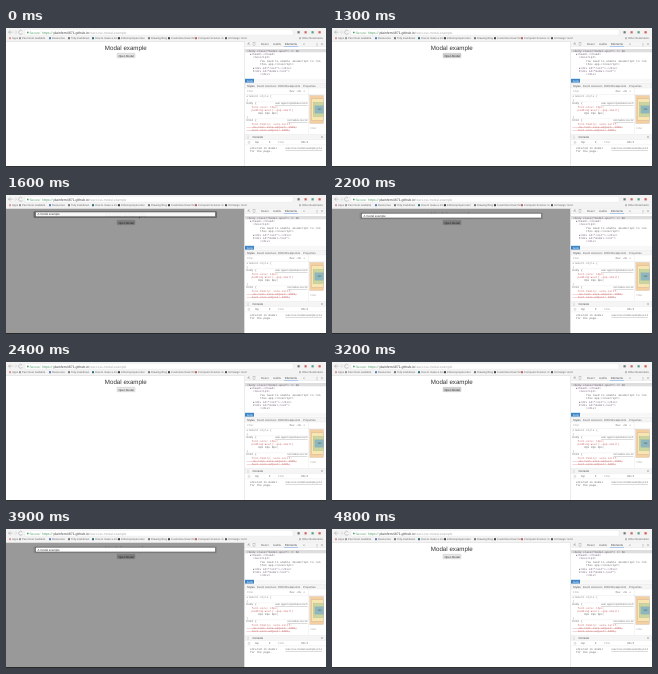
Write an HTML page that moves like this. It is 320x139 px and loops after 5100 ms.

```html
<!DOCTYPE html>
<html lang="en">
<head>
<meta charset="utf-8">
<title>Modal example</title>
<style>
html, body { margin: 0; width: 100%; height: 100%; overflow: hidden; background: #fff; }
svg { display: block; }
text { font-family: "Liberation Sans", Arial, sans-serif; white-space: pre; text-rendering: geometricPrecision; }
.mono { font-family: "Liberation Mono", monospace; }
</style>
</head>
<body>
<svg width="320" height="139" viewBox="0 0 320 139">
  <g id="page"></g>
  <g id="overlay">
    <rect y="13.5" width="238.5" height="125" fill="#000" opacity=".4"/>
    <g id="modal"></g>
  </g>
  <g id="chrome"></g>
  <g id="tools"></g>
</svg>
<script>
const $ = id => document.getElementById(id);
let layer;

function add(tag, attrs, content = '') {
  const el = document.createElementNS('http://www.w3.org/2000/svg', tag);
  for (const key in attrs) el.setAttribute(key, attrs[key]);
  el.textContent = content;
  return layer.appendChild(el);
}
const rect = (x, y, width, height, fill, more) => add('rect', { x, y, width, height, fill, ...more });
const text = (x, y, str, size, fill = '#666', more) => add('text', { x, y, 'font-size': size, fill, ...more }, str);
const path = (d, stroke, width = .4) => add('path', { d, stroke, 'stroke-width': width, fill: 'none' });
const code = (x, y, str, fill, more) => text(x, y, str, 2.8, fill, { class: 'mono', ...more });

// Page
layer = $('page');
text(119.8, 21.8, 'Modal example', 6.2, '#333', { 'text-anchor': 'middle' });
const button = rect(111, 25.3, 18, 4.4, '#e8e8e8', { rx: .6, stroke: '#bbb', 'stroke-width': .4 });
text(120, 28.5, 'Open Modal', 2.8, '#333', { 'text-anchor': 'middle' });

// Modal, drawn at its resting place
layer = $('modal');
const shadow = rect(27.5, 17.5, 183.5, 6.7, '#000', { rx: 1, opacity: .3 });
rect(29.5, 18.2, 180, 4.8, '#fff', { stroke: '#555', 'stroke-width': .6 });
text(31.5, 21.7, 'A modal example', 2.9, '#333');

// Browser bars
layer = $('chrome');
rect(0, 0, 320, 13.6, '#f3f3f3');
rect(0, 13.2, 320, .4, '#d0d0d0');
path('M4.5 2.4l-2 1.8 2 1.8M2.5 4.2h4', '#888');
path('M9 2.4l2 1.8-2 1.8M11 4.2H7.5', '#ccc');
path('M16.2 3a2 2 0 1 0 .3 2', '#888');
rect(19, 1.4, 268, 5.8, '#fff', { rx: 1, stroke: '#ddd', 'stroke-width': .3 });
rect(21, 3.7, 1.6, 1.6, '#5a9f70');
text(23.4, 5.5, 'Secure', 3.3, '#5a9f70');
rect(34.4, 2.6, .2, 3.4, '#ccc');
text(36, 5.5, 'https://', 3.5, '#5a9f70');
text(47.4, 5.5, 'plainfern4871.github.io', 3.5, '#444');
text(82.4, 5.5, '/react-css-modal-example', 3.3, '#aaa');
['#777', '#c66', '#5a9f80', '#d65a4e']
  .forEach((c, i) => rect(291.5 + i * 7, 3.2, 2.2, 2.2, c));
[
  [3, 'Apps', '#d99'], [13, 'Past most readable', '#999'], [43, 'Resources', '#5b7fb0'],
  [62, 'Tidy markdown', '#777'], [86, 'How to make a mo', '#2f6f78'],
  [112, 'intheloop/open-inter', '#444'], [142, 'Drawing Blog', '#777'],
  [162, 'Customize React M', '#444'], [189, 'Computer Science: G', '#b66'],
  [219, 'UI Design: Grid', '#555'], [293, 'Other Bookmarks', '#bbb']
].forEach(([x, label, color]) => {
  rect(x, 9.2, 2, 2, color);
  text(x + 3, 11.2, label, 2.7);
});

// Developer tools
layer = $('tools');
const tag = '#75607a', prop = '#cc7070', rule = '#ddd';
rect(238.5, 13.7, 81.5, 125, '#fff');
rect(238.4, 13.7, .4, 125, '#ccc');
rect(239, 13.7, 81, 5.2, '#f5f5f5');
rect(239, 18.7, 81, .3, rule);
path('M242 15l2.3 2.2M242 15v2M242 15h2', '#888');
rect(247, 14.8, 2, 2.8, 'none', { stroke: '#888', 'stroke-width': .3 });
text(255, 17.2, 'React', 2.9);
text(267, 17.2, 'Audits', 2.9);
text(279, 17.2, 'Elements', 2.9, '#444');
rect(278, 18.2, 14, .5, '#6c9ee8');
text(297, 17.2, '»', 3.2);
path('M311 15.2v.7m0 .5v.7m0 .5v.6', '#888', .6);
path('M315 15.1l2 2m0-2l-2 2', '#888');

rect(239, 21, 81, 3.3, '#dedede');
[
  [241, '<body class="modal-open"> == $0', tag],
  [244, '▸<head>…</head>', tag],
  [247, '<noscript>', tag],
  [254, 'You need to enable JavaScript to run'],
  [254, 'this app.</noscript>'],
  [247, '▸<div id="root">…</div>', tag],
  [247, '▾<div id="modal-root">', tag],
  [254, '</div>', tag]
].forEach(([x, str, color], i) => code(x, 23.5 + i * 3.4, str, color));
rect(239, 50.8, 81, 3.8, '#f7f7f7');
rect(239, 50.8, 9, 3.8, '#3d85c6');
text(241, 53.6, 'body', 2.7, '#fff');

rect(239, 55.2, 81, 4.8, '#f5f5f5', { stroke: rule, 'stroke-width': .3 });
text(241, 58.5, 'Styles', 2.8, '#444');
text(251, 58.5, 'Event Listeners', 2.8);
text(272, 58.5, 'DOM Breakpoints', 2.8);
text(297, 58.5, 'Properties', 2.8);
text(241, 64.2, 'Filter', 2.8, '#aaa');
text(283, 64.2, ':hov   .cls   +', 2.8);
rect(239, 66, 81, .3, rule);
rect(302.4, 60, .3, 46, rule);

const link = (x, y, str) =>
  text(x, y, str, 2.7, '#777', { 'text-anchor': 'end', 'text-decoration': 'underline' });
const struck = { 'text-decoration': 'line-through' };
[
  ['element.style {', '#888'], ['}', '#888'],
  ['body {'], ['   font-size: 16px;', prop], ['   padding:▸var(--gap-small)', prop],
  ['       0px 0px 0px;'], ['}', '#888'],
  ['html {'], ['   font-family: sans-serif;', prop],
  ['   -ms-text-size-adjust: 100%;', prop, struck], ['   text-size-adjust: 100%;', prop, struck]
].forEach(([str, color, more], i) => code(240.5, 69.3 + i * 3.4, str, color, more));
link(301.5, 76.1, 'user agent stylesheet.css:5');
link(301.5, 93.1, 'normalize.css:12');
path('M240 73.7H302M240 90.7H302', '#e4e4e4', .3);

// Box model, nested toward the right edge
['#f5cf9f', '#f8e6b0', '#c9d6a0', '#8cb6c0'].forEach((c, i) =>
  rect(303.8 + i * 1.7, 67.5 + i * 3.4, 13.7 - i * 1.7, 28 - i * 6.8, c, { stroke: '#999', 'stroke-width': .2 }));
text(313.4, 82.4, '180', 2.3, '#555', { 'text-anchor': 'middle' });
text(304.5, 101, 'Filter', 2.7, '#aaa');

// Console drawer
rect(239, 106.5, 81, 5, '#f5f5f5', { stroke: rule, 'stroke-width': .3 });
path('M242 107.7v.7m0 .5v.7m0 .5v.6', '#888', .5);
text(246.5, 109.9, 'Console', 2.9, '#444');
path('M315 108l2 2m0-2l-2 2', '#888');
rect(239, 116.8, 81, .3, rule);
add('circle', { cx: 243, cy: 114.4, r: 1, fill: 'none', stroke: '#888', 'stroke-width': .3 });
text(249, 115.3, 'top', 2.8);
text(263, 115.3, '▾', 2.8);
text(272, 115.3, 'Filter', 2.8, '#aaa');
text(295, 115.3, 'Info ▾', 2.8);
code(244, 121, 'entered in modal');
code(244, 124.4, 'for the page.');
link(316, 121, 'react-css-modal-example.js:14');
rect(0, 138.2, 320, .8, '#000');

// Each cycle: hover, open, close
const cycles = [[1300, 1500, 2400], [3200, 3400, 4200]];

function draw(now) {
  const t = Math.floor(now % 5100 / 100) * 100;
  const cycle = cycles.find(([hover, , close]) => t >= hover && t < close);
  const open = cycle && t >= cycle[1];
  button.setAttribute('fill', cycle ? '#cfcfcf' : '#e8e8e8');
  $('overlay').style.display = open ? '' : 'none';
  if (open) {
    const left = (1 - Math.min(1, (t - cycle[1]) / 500)) ** 4;
    $('modal').setAttribute('transform', `translate(0 ${-3 * left})`);
    $('modal').setAttribute('opacity', 1 - .4 * left ** 2);
    shadow.setAttribute('opacity', .1 + .6 * left);
  }
  requestAnimationFrame(draw);
}
draw(performance.now());
</script>
</body>
</html>
```
